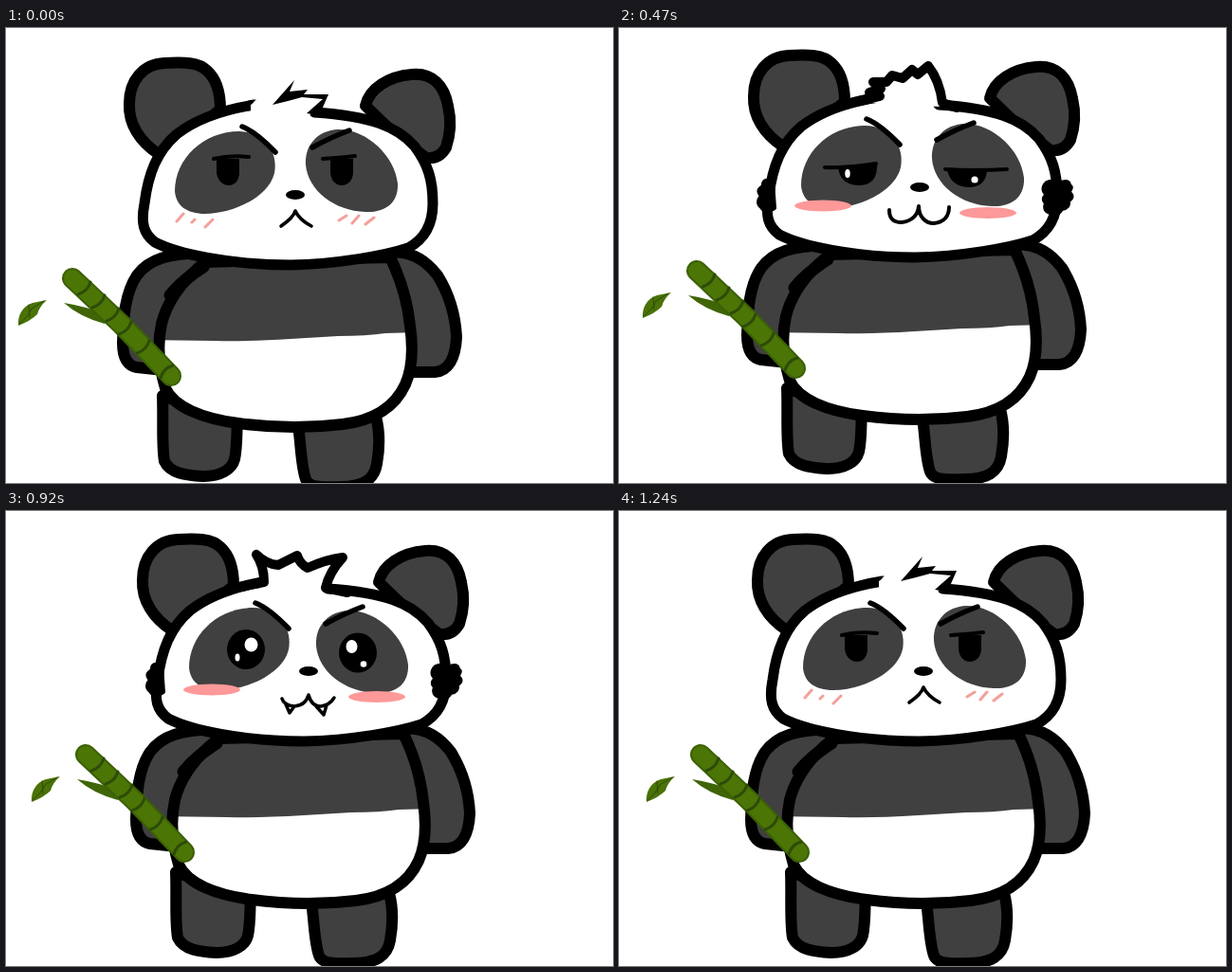
An HTML page that plays this animation: 640x480 px, repeating every 1.28 s.

```html
<!DOCTYPE html>
<html lang="en">
<head>
<meta charset="utf-8">
<title>Panda moods</title>
<style>
html, body { margin: 0; width: 100%; height: 100%; overflow: hidden; background: #fff; }
svg { display: block; width: 100vw; height: 100vh; }
path { stroke-linecap: round; stroke-linejoin: round; }
.ink { fill: none; stroke: #000; }
.fur { fill: #404040; stroke: #000; stroke-width: 12; }
.patch { fill: #404040; }
.hair { fill: #fff; stroke: #000; stroke-width: 10; }
.blush { fill: #fd9999; }
.mood { display: none; }
.shine { fill: #fff; }
</style>
</head>
<body>
<svg viewBox="0 0 640 480">
<defs>
  <path id="torso" d="M210 247C190 263 171 284 164 312C159 335 162 360 168 380C177 400 207 412 245 417C282 422 322 422 355 418C388 414 410 400 421 376C429 358 429 335 426 314C423 286 416 264 405 242Z"/>
  <clipPath id="torsoClip"><use href="#torso"/></clipPath>
  <path id="patchL" class="patch" d="M178 172C178 138 208 109 246 109C274 110 287 132 283 153C277 179 238 196 210 196C190 196 179 187 178 172Z"/>
  <path id="patchR" class="patch" d="M316 144C315 122 330 108 350 107C382 107 410 136 413 164C414 186 398 195 379 194C346 193 318 171 316 144Z"/>
  <g id="brows" class="ink" stroke-width="5.5">
    <path d="M249 104Q264 110 284 131"/>
    <path d="M362 108Q343 115 323 126"/>
  </g>
  <ellipse id="nose" cx="305" cy="176" rx="10" ry="5"/>
  <g id="tufts" stroke="#000" stroke-width="4">
    <path d="M150 170Q139 166 140 175Q132 179 138 185Q132 192 138 197Q143 205 152 198Z"/>
    <path d="M439 171Q446 168 452 172Q462 167 463 174Q467 176 462 181Q469 186 462 190Q463 198 455 199Q450 207 443 203Q435 201 438 193Q433 188 439 184Q432 178 439 171Z"/>
  </g>
</defs>

<g id="body">
  <!-- ears -->
  <path class="fur" d="M161 133C141 120 129 101 130 80C130 55 145 38 167 37C188 36 203 36 212 45C222 54 226 69 226 86L190 115Z"/>
  <path class="fur" d="M379 82C383 64 403 51 428 49C450 47 462 61 466 82C470 99 468 114 464 126C459 135 452 138 443 137L410 112Z"/>
  <!-- arms and legs -->
  <path class="fur" d="M215 238C170 236 150 245 138 261C124 282 124 310 123 332C123 346 127 356 138 358L166 361L200 280Z"/>
  <path class="fur" d="M405 236C431 236 444 247 455 261C468 282 474 306 475 326C474 349 466 362 452 363L426 363Z"/>
  <path class="fur" d="M165 388C166 415 164 440 167 457C173 470 190 472 208 473C226 473 238 466 241 455C244 440 243 426 244 415Z"/>
  <path class="fur" d="M308 419C311 440 311 462 316 476C319 484 330 485 352 484C376 484 388 477 391 460C394 443 394 425 390 410Z"/>
  <!-- torso -->
  <use href="#torso" fill="#fff"/>
  <path clip-path="url(#torsoClip)" fill="#404040" d="M150 230H440V321L400 322Q380 325 350 325L300 328Q250 331 220 330L150 329Z"/>
  <use href="#torso" fill="none" stroke="#000" stroke-width="12"/>
  <path class="ink" stroke-width="13" d="M208 252Q186 266 173 282"/>
  <!-- head -->
  <path d="M262 81C230 86 202 95 180 112C159 130 150 154 146 185C142 206 145 217 157 226C180 238 235 250 300 250C350 249 400 240 424 232C443 222 450 205 450 185C450 160 445 144 431 125C413 104 385 93 325 89" fill="#fff" stroke="#000" stroke-width="11"/>
  <!-- bamboo -->
  <path d="M61 290Q82 293 108 303L104 312Q78 305 61 290Z" fill="#3f6507"/>
  <path d="M13 314C12 303 18 293 28 290L43 287Q35 294 33 302Q26 309 13 314Z" fill="#4a7206"/>
  <path d="M14 312Q24 304 27 296L40 288M24 292L25 305" fill="none" stroke="#2d4b08"/>
  <path d="M70 264L122 313L174 367" fill="none" stroke="#3b6005" stroke-width="22"/>
  <path d="M70 264L122 313L174 367" fill="none" stroke="#4b7505" stroke-width="18"/>
  <path d="M76 281q10-3 13-13M91 295q10-3 13-13M106 309q10-3 13-13M119 323q10-3 13-13M138 343q10-3 13-13M163 369q3-10 13-13" fill="none" stroke="#2d4b08" stroke-width="3"/>
</g>

<g class="mood" id="grumpy">
  <path d="M258 79L283 66L302 58L316 70L337 74L322 90L315 98L258 92Z" fill="#fff"/>
  <path d="M226 87Q246 80 262 77Q260 83 236 89Z"/>
  <path d="M304 55L281 81Q298 77 312 73L334 75L317 90L345 95L372 93L333 86L340 70L314 70L318 65L299 67Z"/>
  <use href="#patchL"/><use href="#patchR"/><use href="#brows"/><use href="#nose"/>
  <path class="ink" stroke-width="4" d="M219 138Q236 134 256 136M334 138Q352 137 368 135"/>
  <path d="M222 138H246V152C246 161 241 166 235 166C227 166 222 159 222 151Z"/>
  <path d="M342 138H366V152C366 161 360 166 354 166C346 166 342 159 342 151Z"/>
  <path class="ink" stroke-width="3.6" d="M290 209Q303 200 305 193Q309 202 322 209"/>
  <path d="M180 204L187 196M196 205L199 202M210 210L218 202M351 203L359 198M365 206L372 198M379 207L388 200" fill="none" stroke="#f4a09b" stroke-width="3"/>
</g>

<g class="mood" id="smug">
  <path class="hair" d="M250 78L275 72L264 68L276 64L268 57L282 57L288 50L299 53L309 44L315 49L326 40Q338 55 341 79L356 84"/>
  <g transform="translate(14 -6)"><use href="#patchL"/><use href="#patchR"/></g>
  <g transform="translate(12 -8)"><use href="#brows"/><use href="#nose"/><use href="#tufts"/></g>
  <path class="ink" stroke-width="4" d="M217 147Q240 148 271 143M344 149Q375 151 409 149"/>
  <path d="M231 147L272 144Q273 166 252 166Q233 165 231 147Z"/>
  <path d="M346 150H388Q387 168 368 168Q350 167 346 150Z"/>
  <ellipse class="shine" cx="241" cy="153.5" rx="2.7" ry="4.5"/>
  <circle class="shine" cx="375" cy="160" r="3.6"/>
  <path class="ink" stroke-width="4" d="M285 192C285 201 289 205 298 205C308 204 315 198 316 188C316 199 323 206 332 206C342 205 348 199 348 189"/>
  <ellipse class="blush" cx="215" cy="187.5" rx="30" ry="6"/>
  <ellipse class="blush" cx="389" cy="195" rx="30" ry="6"/>
</g>

<g class="mood" id="squeezed">
  <path class="hair" d="M246 82L274 78L264 67L280 69L275 60L292 70L299 62L306 71L319 61L325 70L334 61L334 68L356 59L345 68L357 69L339 82L360 86"/>
  <use href="#patchL" x="21" y="6"/><use href="#patchR" x="8" y="2"/>
  <g transform="translate(12 -5)"><use href="#brows"/><use href="#nose"/><use href="#tufts"/></g>
  <path class="ink" stroke-width="6" d="M245 138Q260 145 282 150Q264 157 248 169M379 141Q365 150 348 164Q370 169 395 169"/>
  <path class="ink" stroke-width="5" d="M285 201Q287 212 294 211Q299 209 302 205Q306 203 307 212Q311 205 314 206L319 212L325 207L329 213L334 208L338 211Q353 210 352 200"/>
  <ellipse class="blush" cx="215" cy="190.5" rx="30" ry="6"/>
  <ellipse class="blush" cx="389" cy="198" rx="30" ry="6"/>
</g>

<g class="mood" id="fierce">
  <path class="hair" d="M248 80L272 75Q272 58 264 46Q274 56 287 57L307 47Q310 56 318 60Q338 51 355 49Q341 64 337 81L360 86"/>
  <use href="#patchL" x="15" y="-7"/><use href="#patchR" x="11" y="-2"/>
  <g transform="translate(14 -7)"><use href="#brows"/><use href="#nose"/><use href="#tufts"/></g>
  <ellipse cx="253" cy="146" rx="20" ry="21"/>
  <ellipse cx="371" cy="149.5" rx="20" ry="21"/>
  <ellipse class="shine" cx="258.5" cy="141" rx="7" ry="7.5"/>
  <ellipse class="shine" cx="244" cy="154.5" rx="2.5" ry="4"/>
  <ellipse class="shine" cx="364.5" cy="143" rx="6" ry="7"/>
  <circle class="shine" cx="377" cy="161.5" r="3.3"/>
  <path class="ink" stroke-width="3.5" d="M291 198Q293 205 304 206Q316 205 319 194Q322 206 332 206Q341 205 346 197M295 204L299 213L304 206M327 206L335 215L338 205"/>
  <ellipse class="blush" cx="217" cy="188.5" rx="30" ry="6"/>
  <ellipse class="blush" cx="391" cy="196" rx="30" ry="6"/>
</g>
</svg>
<script>
const LOOP = 1280;
// [start ms, mood, body x, body y]
const steps = [
  [0, 'grumpy', 0, 0],
  [280, 'smug', 12, -8],
  [600, 'squeezed', 12, -5],
  [920, 'fierce', 14, -7],
  [1240, 'grumpy', 16, -7]
];
const body = document.getElementById('body');
const grumpy = document.getElementById('grumpy');
const moods = document.querySelectorAll('.mood');
const start = performance.now();
let shown = null;

function show(step) {
  if (step === shown) return;
  shown = step;
  const [, mood, x, y] = step;
  const shift = `translate(${x} ${y})`;
  body.setAttribute('transform', shift);
  grumpy.setAttribute('transform', shift);
  for (const m of moods) m.style.display = m.id === mood ? 'inline' : 'none';
}

function tick() {
  const t = Math.max(0, performance.now() - start) % LOOP;
  show(steps.findLast(s => s[0] <= t));
  requestAnimationFrame(tick);
}
tick();
</script>
</body>
</html>
```
